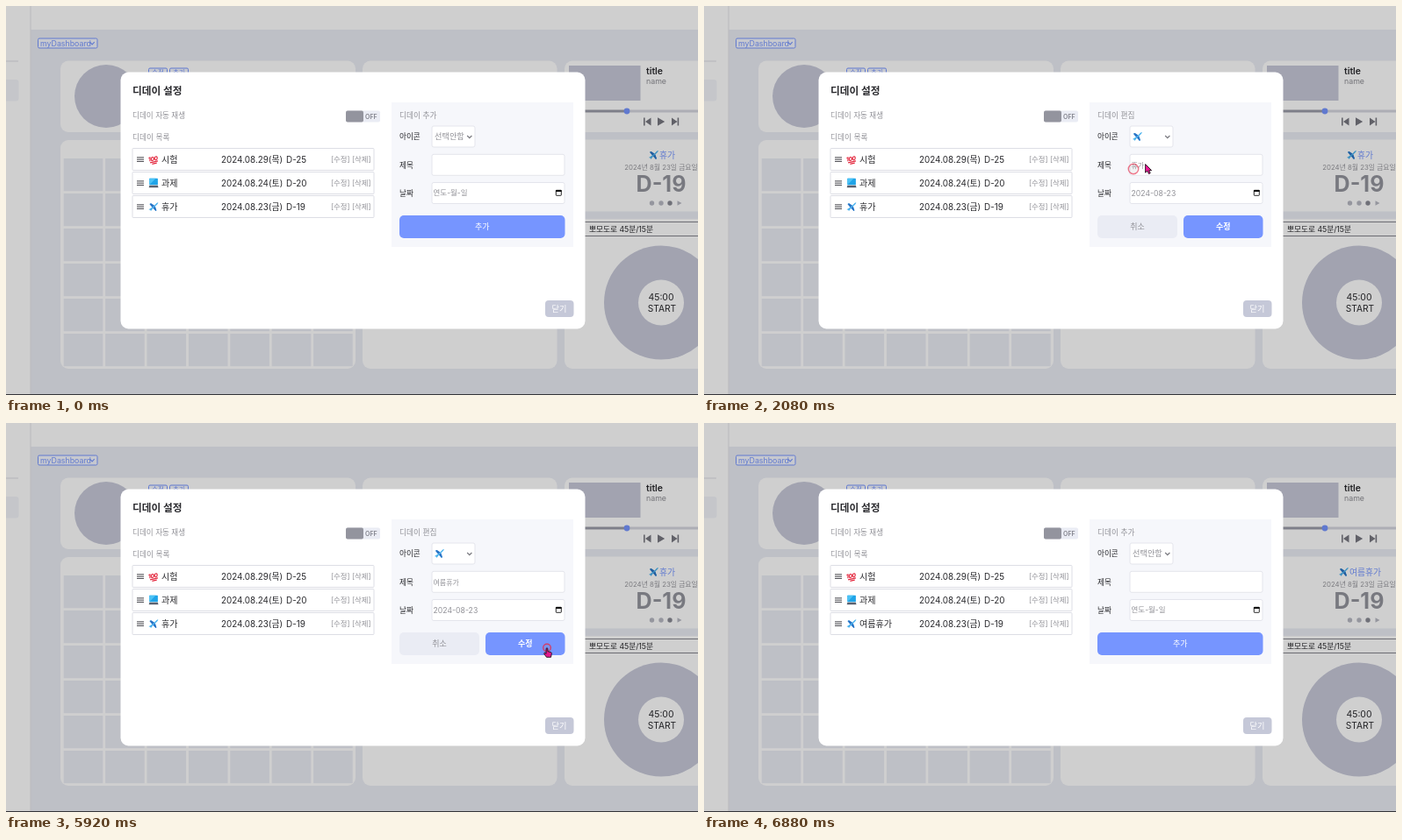
An HTML page for the animation above (8.32 s loop, 788x444 px).

```html
<!DOCTYPE html>
<html lang="ko">
<head>
<meta charset="utf-8">
<title>디데이 설정</title>
<style>
  html, body { margin: 0; width: 100%; height: 100%; overflow: hidden; background: #fff; }
  svg { display: block; width: 788px; height: 444px; }
  text { font-family: Inter, "Noto Sans CJK KR", "Noto Sans CJK", "Noto Sans CJK JP", sans-serif; white-space: pre; }
</style>
</head>
<body>
<svg id="stage" viewBox="0 0 788 444" xmlns="http://www.w3.org/2000/svg"></svg>
<script>
const LOOP = 8320, STEP = 80;
const BG = '#eaecf4', SOFT = '#c7c9d9', BLUE = '#7695ff', GRAY = '#929298', INK = '#29292d';

const rect = (x, y, w, h, fill, r = 0, extra = '') =>
  `<rect x="${x}" y="${y}" width="${w}" height="${h}" rx="${r}" fill="${fill}" ${extra}/>`;
const circle = (x, y, r, fill) => `<circle cx="${x}" cy="${y}" r="${r}" fill="${fill}"/>`;
const text = (x, y, size, fill, s, extra = '') =>
  `<text x="${x}" y="${y}" font-size="${size}" fill="${fill}" ${extra}>${s}</text>`;
const path = (d, fill, extra = '') => `<path d="${d}" fill="${fill}" ${extra}/>`;
const group = (id, body, extra = '') => `<g id="${id}" ${extra}>${body}</g>`;
const MID = 'text-anchor="middle"', BOLD = 'font-weight="700"', SEMI = 'font-weight="600"';
const outline = c => `stroke="${c}" stroke-width="1"`;
const chevron = (x, y, c) => path(`M${x} ${y}l2.6 2.6 2.6-2.6`, 'none', `stroke="${c}" stroke-width="1.2"`);
const use = (id, x, y) => `<use href="#${id}" x="${x}" y="${y}"/>`;

const defs = `<defs>
  <g id="plane">
    ${path('M0 8.5L4 6 1 2.2 2.6 1.6 6.4 4 9 1.3Q10.6.1 10.7.6 11 1.2 9.9 2.5L7.3 5 8.9 9.5 8 10.4 5 7.1 3 9.8 2.4 10.4 2 9.2Z', '#4bb3ee')}
    ${path('M1 2.2L2.6 1.6 6.4 4 4 6ZM7.3 5L8.9 9.5 8 10.4 5 7.1Z', '#2b72c4')}
  </g>
  <g id="hundred">
    <g transform="rotate(-9 5 5)">
      ${text(-.6, 7, 6.6, '#e3243b', '100', 'font-weight="800" font-style="italic" letter-spacing="-.5"')}
      ${path('M1 8.6L10 8M3 10.4L8.5 10', 'none', 'stroke="#e3243b" stroke-width="1.1"')}
    </g>
  </g>
  <g id="laptop">
    ${rect(.8, 0, 9.6, 7.6, '#20a4e8', .6)}${path('M.8 7.6V0H8Z', '#4cc2f5')}
    ${path('M.8 8H10.4L11 10.6H.2Z', '#5b6270')}
  </g>
</defs>`;

function frame() {
  return rect(0, 0, 788, 444, '#fff') + rect(28, 27, 760, 417, BG) +
    rect(27.5, 0, 1, 444, '#e3e4ea') + rect(0, 62.5, 14, 1, '#dcdde3') +
    rect(-4, 84, 18.5, 24.5, '#f3f4f9', 3);
}

function dashboard() {
  let s = rect(36.5, 37, 67.5, 11, '#f4f6ff', 1.5, outline(BLUE)) +
    text(39, 45.8, 8.8, BLUE, 'myDashboard') + chevron(95.5, 41.2, BLUE);
  for (const [x, y, w, h] of [[62, 62.5, 336, 81.5], [62, 153, 336, 261], [406, 62.5, 221.5, 351.5],
    [636, 62.5, 170, 81.5], [636, 152.5, 170, 82], [636, 243, 170, 171]]) s += rect(x, y, w, h, '#fff', 9);

  s += circle(114, 103, 36, SOFT);
  [[162.5, '수정'], [186.5, '추가']].forEach(([x, label]) => {
    s += rect(x, 71, 21, 10, '#f4f6ff', 1.5, outline(BLUE)) + text(x + 10.5, 79, 7.5, BLUE, label, MID);
  });
  for (let i = 0; i < 42; i++)
    s += rect(65.7 + i % 7 * 47.4, 174 + (i / 7 | 0) * 40, 44.6, 37.2, BG);

  s += rect(641, 68, 81.5, 40, SOFT) + text(729, 78, 10.4, INK, 'title', SEMI) + text(729, 89, 8.8, '#8c8c92', 'name') +
    rect(640, 118.5, 67, 3, '#9b9ca8') + rect(707, 118.5, 90, 3, '#d5d6df') + circle(707, 120, 3.4, BLUE) +
    path('M726 127.5h1.6v9h-1.6zM734.5 127.5v9l-6.5-4.5zM742 127.2v9.6l8.2-4.8zM758 127.5v9l6.5-4.5zM764.6 127.5h1.6v9h-1.6z', '#777780');

  s += group('dayShort', use('plane', 732, 164.5) + text(744, 173.6, 9.8, BLUE, '휴가')) +
    group('dayLong', use('plane', 723, 164.5) + text(735, 173.6, 9.8, BLUE, '여름휴가')) +
    text(746, 187, 7.8, '#96969c', '2024년 8월 23일 금요일', MID) +
    text(746, 212.3, 25, '#94959d', 'D-19', `${MID} ${BOLD}`) +
    circle(735.5, 225, 2.7, '#b7b8c3') + circle(746, 225, 2.7, '#b7b8c3') + circle(756, 225, 2.7, '#898a94') +
    path('M764.5 222.3v5.4l5-2.7z', '#b7b8c3');

  s += rect(643.5, 246.5, 160, 16, '#fff', 0, outline('#85858c')) + text(664, 257.7, 8.7, INK, '뽀모도로 45분/15분') +
    circle(746, 338.5, 65, SOFT) + circle(746, 338.5, 26, '#fff') +
    text(746, 336.2, 10.4, INK, '45:00', MID) + text(747, 348.6, 10.2, INK, 'START', MID);
  return s;
}

function row(y, icon, name, date, left) {
  let s = rect(144, y, 275, 25, '#fff', 1, outline('#dddee5'));
  for (const k of [0, 2.3, 4.6]) s += rect(149, y + 9.8 + k, 8, 1.1, '#55555b');
  return s + use(icon, 162.5, y + 7.2) + name + text(245, y + 16, 9.9, INK, date) +
    text(319, y + 16, 9.9, INK, left) + text(370, y + 15.5, 8.4, GRAY, '[수정]') + text(394, y + 15.5, 8.4, GRAY, '[삭제]');
}

function modal() {
  const name = (y, s) => text(177, y, 10.1, INK, s);
  const box = (y, w) => rect(485, y, w, 24, '#fff', 2, outline('#e4e5ec'));
  const button = (x, w, fill, color, label, extra = '') =>
    rect(x, 239, w, 26, fill, 5) + text(x + w / 2, 255.4, 9, color, label, `${MID} ${extra}`);
  return rect(130.5, 75.5, 529, 293, '#fff', 9) +
    text(144, 100.6, 11.7, INK, '디데이 설정', BOLD) +
    text(144, 127.8, 8.6, GRAY, '디데이 자동 재생') + text(144, 153.4, 8.7, GRAY, '디데이 목록') +
    rect(387, 119.5, 39, 13, BG, 2) + rect(387, 119.5, 20, 13, '#93949e', 2) +
    text(409, 128.6, 7, '#83848e', 'OFF', SEMI) +
    row(162.5, 'hundred', name(178.5, '시험'), '2024.08.29(목)', 'D-25') +
    row(189.5, 'laptop', name(205.5, '과제'), '2024.08.24(토)', 'D-20') +
    row(216.5, 'plane', group('rowShort', name(232.5, '휴가')) + group('rowLong', name(232.5, '여름휴가')), '2024.08.23(금)', 'D-19') +
    rect(439, 110, 207, 165, '#f6f7fb') +
    text(448, 152, 8.6, INK, '아이콘') + text(448, 184.5, 8.6, INK, '제목') + text(448, 216.5, 8.6, INK, '날짜') +
    box(137, 49) + box(169.3, 151) + box(201.5, 151) +
    chevron(525.2, 148, '#77777d') +
    rect(626.3, 210.3, 6, 6, '#fff', .5, 'stroke="#111" stroke-width=".9"') + rect(626, 210, 6.6, 2, '#111') +
    group('addForm', text(448, 127.8, 8.7, GRAY, '디데이 추가') + text(488, 152.2, 9.2, GRAY, '선택안함') +
      text(486.5, 216.4, 8.5, GRAY, '연도-월-일') + button(448, 188.5, BLUE, '#fff', '추가')) +
    group('editForm', text(448, 127.8, 8.7, GRAY, '디데이 편집') + use('plane', 488, 143.5) +
      text(486.5, 216.6, 8.7, GRAY, '2024-08-23') + button(448, 91, BG, GRAY, '취소') +
      button(546, 90.5, BLUE, '#fff', '수정', SEMI) + text(486.5, 184.6, 8, GRAY, '', 'id="value"') +
      rect(487, 186.3, 7, .8, '#77777d', 0, 'id="underline"') + rect(501.2, 176, .9, 11, '#222', 0, 'id="caret"')) +
    rect(614, 336, 32.5, 19, '#c5c8d8', 4) + text(630, 349, 9.2, '#fff', '닫기', MID);
}

const pointer = `<circle id="ring" stroke-width="1.4"/>` + group('cursor',
  path('M0 0V9.6L2.3 7.7 3.9 11 5.6 10.2 4.1 7.1H7Z', '#f01796', 'id="arrow" stroke="#1b1018" stroke-width=".9"') +
  path('M-.9.9Q0-.5.9.9V4.2L4.6 5.2Q5.5 5.6 5.3 7L4.5 10.8H-.5L-3.2 7Q-3.4 5.6-2.2 5.7L-.9 6.8Z', '#e4198f', 'id="hand" stroke="#1b1018" stroke-width=".9"'));

const stage = document.getElementById('stage');
stage.innerHTML = defs + frame() +
  group('app', dashboard() + rect(0, 0, 788, 444, '#000', 0, 'opacity=".19"') + modal()) +
  rect(0, 443, 788, 1, '#333337') + pointer;

const $ = id => document.getElementById(id);
const show = (id, on) => $(id).setAttribute('display', on ? 'inline' : 'none');
const within = (t, a, b) => t >= a && t < b;

// time, x, y
const route = [[80, 560, 312], [880, 385.5, 230.5], [1440, 385.5, 230.5], [1840, 489, 186], [2000, 489, 186],
  [2560, 735, 88], [2640, 735, 88], [2800, 699.5, 163.5], [5200, 699.5, 163.5], [5680, 616, 256.5],
  [6320, 616, 256.5], [6720, 560, 312]];
const clicks = [[1040, 386, 230.5], [2000, 489, 186], [5920, 616, 256.5]];
const typing = [[0, ''], [2560, 'ㅇ'], [3600, '여'], [3760, '열'], [3920, '여르'], [4000, '여름']];
const RELOAD = 6000, READY = 6240;

function place(t) {
  const i = Math.max(1, route.findIndex(p => p[0] > t));
  const [a, b] = [route[i - 1], route[i]];
  const k = Math.min(1, Math.max(0, (t - a[0]) / (b[0] - a[0])));
  const e = k * k * (3 - 2 * k);
  return [a[1] + (b[1] - a[1]) * e, a[2] + (b[2] - a[2]) * e];
}

function draw(t) {
  const editing = within(t, 1120, RELOAD), done = t >= READY;
  show('app', !within(t, RELOAD, READY));
  show('addForm', !editing);
  show('editForm', editing);
  for (const id of ['day', 'row']) { show(id + 'Short', !done); show(id + 'Long', done); }

  const typed = typing.filter(p => p[0] <= t).pop()[1];
  $('value').textContent = typed + '휴가';
  $('underline').setAttribute('width', typed.length * 7.2);
  show('underline', typed && t < 5920);
  show('caret', within(t, 4000, 4560) || within(t, 5120, 5680));

  const visible = within(t, 80, 6720);
  show('cursor', visible);
  if (visible) $('cursor').setAttribute('transform', `translate(${place(t)})`);
  const hand = within(t, 720, 1520) || within(t, 5520, 6400);
  show('hand', hand);
  show('arrow', !hand);

  const click = clicks.find(c => within(t, c[0], c[0] + 400));
  show('ring', click);
  if (click) {
    const age = t - click[0], ring = $('ring'), fade = Math.max(.12, 1 - age / 340);
    const set = (k, v) => ring.setAttribute(k, v);
    set('cx', click[1]); set('cy', click[2]); set('r', 4.3 + age * .018);
    set('stroke', age < 240 ? `rgba(232,40,70,${fade * .8})` : `rgba(110,110,120,${fade})`);
    set('fill', `rgba(150,140,150,${fade * .15})`);
  }
}

const start = performance.now();
let last = -1;
function tick() {
  const t = Math.floor((performance.now() - start) % LOOP / STEP) * STEP;
  if (t !== last) draw(last = t);
  requestAnimationFrame(tick);
}
tick();
</script>
</body>
</html>
```
